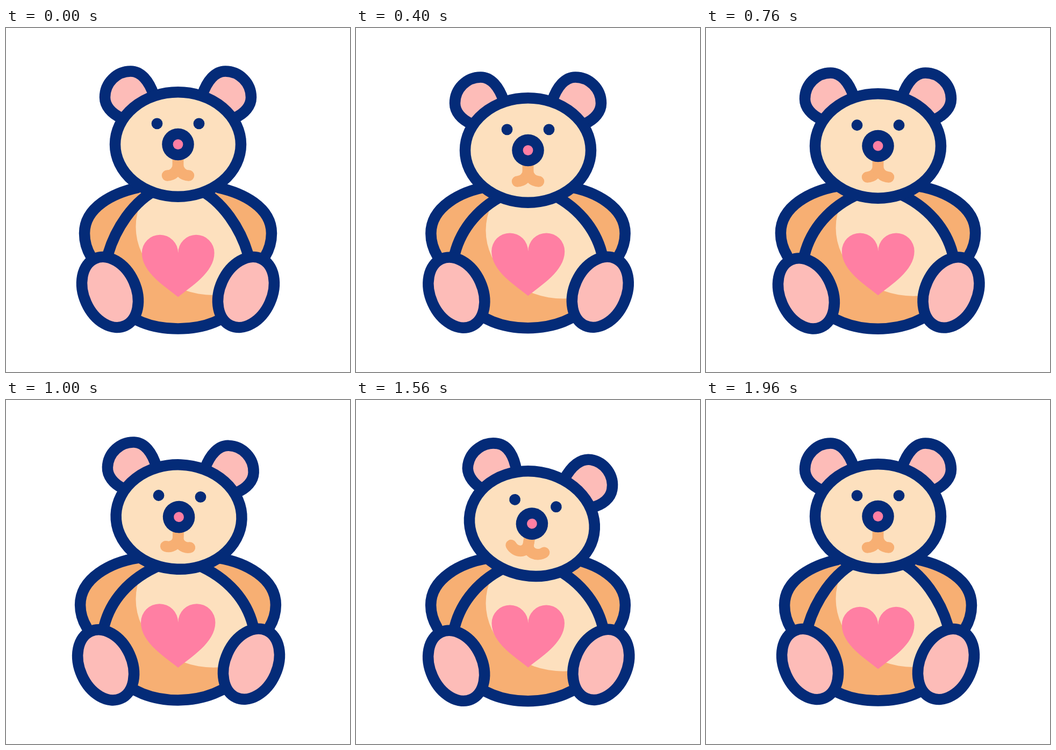
Recreate the animation shown at these times as an HTML page with a canvas. Size 640 by 640 pixels, loop 2 s.

```html
<!DOCTYPE html>
<html lang="en">
<head>
<meta charset="utf-8">
<title>Teddy bear</title>
<style>
  html, body { margin: 0; width: 100%; height: 100%; overflow: hidden; background: #fff; }
  canvas { display: block; width: 100vw; height: 100vh; }
</style>
</head>
<body>
<canvas id="stage"></canvas>
<script>
const SIZE = 640, LOOP = 2000, MID = 320, LINE = 20.5;
const NAVY = '#042b78', CREAM = '#fde0be', ORANGE = '#f7af73';
const BLUSH = '#fdbcb8', PINK = '#ff7fa3';

const canvas = document.getElementById('stage');
const ctx = canvas.getContext('2d');

const mix = (a, b, k) => a + (b - a) * k;

function ease(t, from, to) {
  const x = Math.min(1, Math.max(0, (t - from) / (to - from)));
  return x * x * (3 - 2 * x);
}

// Eases up from a to b, and back down from c to d.
const pulse = (t, a, b, c, d) => ease(t, a, b) - ease(t, c, d);

function poseAt(t) {
  const breath = Math.cos(Math.PI * (t - 540) / 640) ** 4;
  const active = pulse(t, 175, 520, 1800, 1960);
  const puff = mix(.525, 1.02, breath);
  const drop = 12.7 * (1 - puff) * pulse(t, 0, 200, 1800, 1960);
  const bob = 11 * pulse(t, 0, 400, 392, 950) + 13 * pulse(t, 950, 1240, 1720, 1900);
  const beat = Math.cos(Math.PI * (t - 520) / 440) ** 2;
  return {
    squash: puff * active,
    drop,
    sway: active * (1 - breath),
    armDrop: drop * (1 - .9 * active),
    heartY: mix(442.5 + drop, 439.5 - 6.5 * breath, active),
    heartSize: 1 + .03 * active * beat,
    bob,
    shine: .6 * bob,
    lean: pulse(t, 900, 1240, 1740, 1960)
  };
}

// Bezier outlines of the left half; k squashes or smiles.
const bodyShape = k => [
  [285 + 3 * k, 298 + 7 * k], [235 - 13 * k, 322 + 9 * k], [203 - 15 * k, 376 - 9 * k],
  [190 - 12 * k, 420 - 8 * k], [172 - 14 * k, 490 - 10 * k], [215 + 10 * k, 559.5 - 10 * k],
  [MID, 559.5 - 10 * k]
];
const armShape = k => [
  [245, 297 - 6 * k], [200 - 10 * k, 307 - 9 * k], [146 - 13 * k, 333 - 3 * k],
  [146 - 13 * k, 382 - 2 * k], [146 - 13 * k, 400 - 2 * k], [152 - 13 * k, 415 - 4 * k],
  [158 - 13 * k, 425 - 4 * k]
];
const lipShape = (k, lift) => [
  [-20 - 11.5 * k, 58 - lift * k], [-9 - 12 * k, 58 + k], [0, 49 + 7 * k], [0, 38]
];
const EAR = [[275, 125], [266, 98], [251, 80.5], [232, 80.5], [206, 80.5], [184, 102], [184, 129],
  [184, 145], [196, 159], [214, 167]];

const shift = (pts, dx, dy) => pts.map(([x, y]) => [x + dx, y + dy]);
const flip = pts => pts.map(([x, y]) => [2 * MID - x, y]).reverse();

function curve(pts) {
  for (let i = 1; i < pts.length; i += 3) {
    ctx.bezierCurveTo(...pts[i], ...pts[i + 1], ...pts[i + 2]);
  }
}

function begin(pts) {
  ctx.beginPath();
  ctx.moveTo(...pts[0]);
  curve(pts);
}

function fill(color) {
  ctx.fillStyle = color;
  ctx.fill();
}

function stroke(color) {
  ctx.strokeStyle = color;
  ctx.lineWidth = LINE;
  ctx.stroke();
}

function oval(x, y, rx, ry, angle = 0) {
  ctx.beginPath();
  ctx.ellipse(x, y, rx, ry, angle, 0, Math.PI * 2);
}

function dot(x, y, r, color) {
  oval(x, y, r, r);
  fill(color);
}

// Draws a left part (side 0) and its mirror image (side 1).
function pair(draw) {
  for (const side of [0, 1]) {
    ctx.save();
    if (side) {
      ctx.translate(2 * MID, 0);
      ctx.scale(-1, 1);
    }
    draw(side);
    ctx.restore();
  }
}

function drawArms(m) {
  const arm = shift(armShape(m.squash), 0, m.armDrop);
  pair(() => {
    begin(arm);
    ctx.lineTo(210, 430);
    ctx.lineTo(270, 320);
    fill(ORANGE);
    begin(arm);
    stroke(NAVY);
  });
}

function drawBody(m) {
  const left = shift(bodyShape(m.squash), 0, m.drop);
  const foot = left[left.length - 1];
  const right = flip([...shift(left.slice(0, -1), -2.5 * m.sway, -m.sway), foot]);
  const outline = () => {
    begin(left);
    curve(right);
    ctx.closePath();
  };
  outline();
  fill(ORANGE);
  ctx.save();
  ctx.clip();
  oval(386, 370 + m.shine, 144.5, 127);
  fill(CREAM);
  ctx.restore();
  outline();
  stroke(NAVY);
}

function drawHeart(m) {
  const r = 33.7, y = -24;
  ctx.save();
  ctx.translate(MID + .2, m.heartY);
  ctx.scale(m.heartSize, m.heartSize);
  ctx.beginPath();
  ctx.moveTo(0, 58);
  ctx.bezierCurveTo(-22, 39.5, -2 * r, 13, -2 * r, y);
  ctx.arc(-r, y, r, Math.PI, 0);
  ctx.arc(r, y, r, Math.PI, 0);
  ctx.bezierCurveTo(2 * r, 13, 22, 39.5, 0, 58);
  fill(PINK);
  ctx.restore();
}

function drawFeet(m) {
  pair(side => {
    const sway = side * m.sway;
    const x = 193.5 - 13 * m.squash - 2.5 * sway;
    const y = 491.5 - 6 * m.squash + m.drop - 2 * sway;
    oval(x, y, 48.5, 68.5, -.424);
    fill(BLUSH);
    stroke(NAVY);
  });
}

function drawHead(m) {
  const neck = 260, y = 216.5;
  ctx.save();
  ctx.translate(MID, neck + m.bob);
  ctx.rotate(m.lean * 9.8 * Math.PI / 180);
  ctx.translate(-MID, -neck);

  pair(() => {
    begin(EAR);
    fill(BLUSH);
    stroke(NAVY);
  });
  oval(MID, y, 117, 97.2);
  fill(CREAM);
  stroke(NAVY);
  pair(side => {
    dot(281, 177.8, 10.4, NAVY);
    begin(shift(lipShape(m.lean, 12 - 3 * side), MID, y));
    ctx.lineTo(MID, y + 15);
    stroke(ORANGE);
  });
  dot(MID, y, 29.8, NAVY);
  dot(MID, y, 9.4, PINK);
  ctx.restore();
}

function frame(now) {
  const ratio = window.devicePixelRatio || 1;
  const w = Math.round(innerWidth * ratio), h = Math.round(innerHeight * ratio);
  if (canvas.width !== w || canvas.height !== h) {
    canvas.width = w;
    canvas.height = h;
  }
  ctx.setTransform(w / SIZE, 0, 0, h / SIZE, 0, 0);
  ctx.lineCap = ctx.lineJoin = 'round';
  ctx.fillStyle = '#fff';
  ctx.fillRect(0, 0, SIZE, SIZE);

  const m = poseAt(now % LOOP);
  for (const draw of [drawArms, drawBody, drawHeart, drawFeet, drawHead]) draw(m);
}

const start = performance.now();
function loop() {
  frame(performance.now() - start);
  requestAnimationFrame(loop);
}
loop();
</script>
</body>
</html>
```
